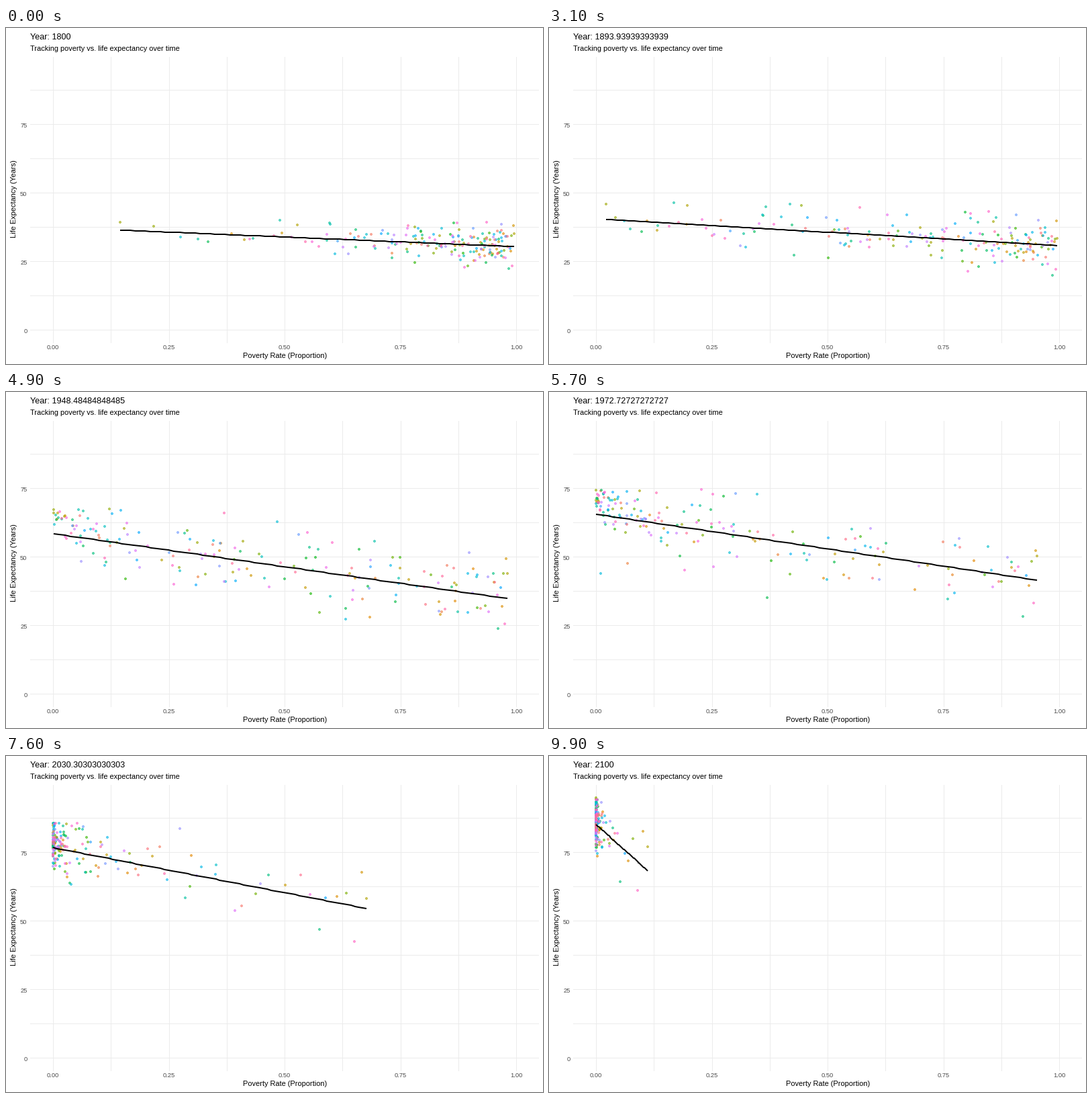
A matplotlib script that plays this animation: 800x500 px, repeating every 10 s.

```python
import numpy as np
import matplotlib.pyplot as plt
from matplotlib.animation import FuncAnimation

W, H, DPI = 800, 500, 100
PX = 72 / DPI
FRAMES, INTERVAL = 100, 100
N, SHOCKS = 193, 150
plt.rcParams["font.family"] = "Liberation Sans"

# life expectancy of richest and poorest, and its spread, at turning points
TURNS = [1800, 1894, 1948.5, 1997, 2100]
RICH = [37.5, 40.6, 58.5, 72.7, 85.2]
POOR = [30.4, 30.8, 34.8, 48.2, 67.2]
SPREAD = [3.2, 4.2, 6.5, 5.8, 6.5]

rng = np.random.default_rng(12)
rank = (rng.permutation(N) + 1) / (N + 1)
odds = np.log(rank / (1 - rank))
base = np.clip(rng.standard_t(6, N), -2.6, 2.6)
base[[rank.argmin(), rank.argmax()]] = 1.2
phase = rng.uniform(0, 2 * np.pi, (2, N))
period = rng.uniform(50, 160, (2, N))
flu = rng.exponential(7, N)

shock_who = rng.integers(0, N, SHOCKS)
shock_year = rng.uniform(1800, 1975, SHOCKS)
shock_force = rng.beta(1, 5, SHOCKS)


def px(x):
    return 70 + 690 * np.asarray(x)


def py(y):
    return 449.5 - 4.08 * np.asarray(y)


def sigmoid(v):
    return 1 / (1 + np.exp(-v))


def hcl(h, c=100, l=65):
    """Polar CIE-LUV colours to sRGB."""
    h = np.radians(h)
    u = c * np.cos(h) / (13 * l) + .19784
    v = c * np.sin(h) / (13 * l) + .46834
    Y = ((l + 16) / 116) ** 3
    xyz = np.array([9 * Y * u / (4 * v), Y + 0 * u,
                    Y * (12 - 3 * u - 20 * v) / (4 * v)])
    m = np.array([[3.2406, -1.5372, -.4986],
                  [-.9689, 1.8758, .0415],
                  [.0557, -.2040, 1.0570]])
    rgb = np.clip(m @ xyz, 0, 1)
    return np.where(rgb > .0031308, 1.055 * rgb ** (1 / 2.4) - .055, 12.92 * rgb).T


def pulse(year, center, width):
    return np.maximum(0, 1 - np.abs(year - center) / width)


def wave(k, year):
    return np.sin(2 * np.pi * year / period[k] + phase[k])


def poverty(year):
    """Logistic decline: the whole field falls, its gap widens, then closes."""
    s = (year - 1800) / 300
    worst = sigmoid(9.9 - 11.9 * s)
    level = 1.95 - 7.3 * sigmoid((s - .6) / .13)
    gap = .65 + np.exp(-((s - .8) / .45) ** 2)
    drift = 2 * rank * (1 - rank) * wave(0, year)
    return worst * sigmoid(level + gap * odds + drift), worst


def state(year):
    x, worst = poverty(year)
    rich, poor, spread = (np.interp(year, TURNS, k) for k in (RICH, POOR, SPREAD))
    drop = pulse(year, 1918, 1)
    bonus = 8 * np.exp(-((year - 1945) / 55) ** 2) + 1

    def trend(v):
        return rich + (poor - rich) * v / worst

    scale = spread * (.7 + .3 * np.minimum(x / .1, 1))
    y = trend(x) + scale * (.85 * base + .45 * wave(1, year))
    y += bonus * np.exp(-x / .05)
    top = rich + 1.5 * spread
    y = np.where(y > top, 2 * top - y, y) - flu * drop
    np.multiply.at(y, shock_who, 1 - shock_force * pulse(year, shock_year, 2.5))

    fx = np.linspace(x.min(), x.max(), 80)
    return x, np.maximum(y, 1.3), fx, trend(fx) - 7 * drop


fig = plt.figure(figsize=(W / DPI, H / DPI), dpi=DPI, facecolor="white")
ax = fig.add_axes([0, 0, 1, 1])
ax.set(xlim=(0, W), ylim=(H, 0))
ax.axis("off")


def label(x, y, s, size, color="black", **kw):
    return ax.text(x, y, s, fontsize=size * PX, color=color, va="baseline", **kw)


grid = dict(color="#EBEBEB", lw=PX, snap=False, solid_capstyle="butt", zorder=1)
for i in range(9):
    gx = np.floor(px(i / 8) + .5) + .5
    ax.plot([gx, gx], [43, 469], **grid)
for i in range(8):
    gy = py(12.5 * i)
    ax.plot([36, 794], [gy, gy], **grid)

for i in range(5):
    label(px(i / 4), 478, f"{i / 4:.2f}", 9.4, "#4D4D4D", ha="center")
for v in (0, 25, 50, 75):
    label(31.5, py(v) + 4, str(v), 9.4, "#4D4D4D", ha="right")

title = label(36, 17, "", 12.6)
label(36, 34, "Tracking poverty vs. life expectancy over time", 11)
label(415.5, 491, "Poverty Rate (Proportion)", 11, ha="center")
label(15, 254.5, "Life Expectancy (Years)", 11, ha="center",
      rotation=90, rotation_mode="anchor")

rgb = hcl(15 + 360 * np.arange(N) / N)
dots = ax.scatter(np.zeros(N), np.zeros(N), s=(2.84 * PX) ** 2, linewidths=PX,
                  facecolors=np.c_[rgb, np.full(N, .5)],
                  edgecolors=np.c_[rgb, np.full(N, .7)], zorder=2)
fit, = ax.plot([], [], color="black", lw=2 * PX, snap=False,
               solid_capstyle="butt", zorder=3)


def draw(i):
    year = 1800 + 300 * i / (FRAMES - 1)
    x, y, fx, fy = state(year)
    title.set_text(f"Year: {year:.15g}")
    dots.set_offsets(np.round(np.c_[px(x), py(y)]))
    fit.set_data(np.round(px(fx)), np.round(py(fy)))
    return title, dots, fit


anim = FuncAnimation(fig, draw, frames=FRAMES, interval=INTERVAL,
                     repeat=True, repeat_delay=0, blit=False)
plt.show()
```
